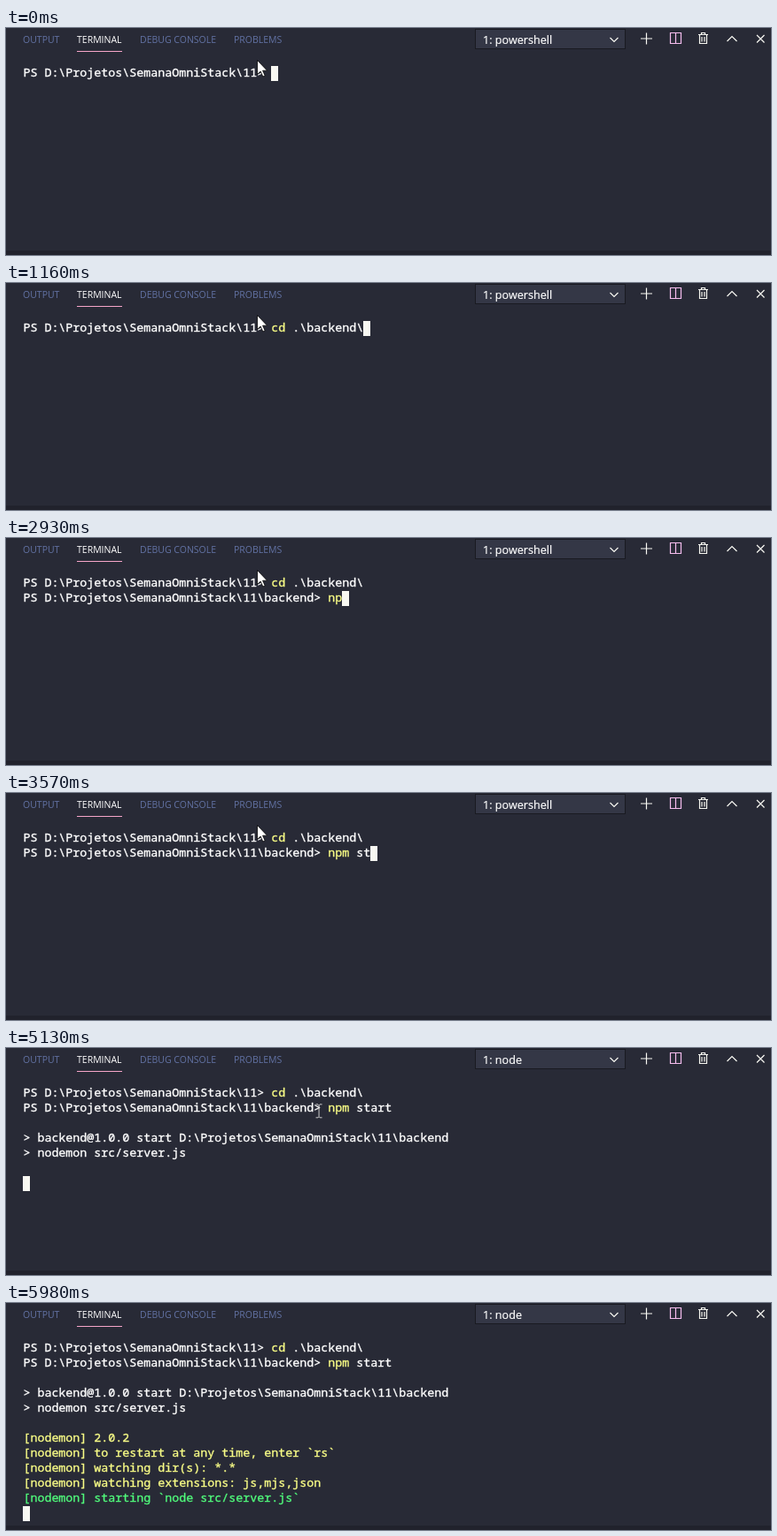
Recreate the animation shown at these times as an HTML page. Size 863 px wide and 257 px high, loop 6.21 s.

```html
<!DOCTYPE html>
<html lang="en">
<head>
<meta charset="utf-8">
<title>Terminal</title>
<style>
  html, body { margin: 0; width: 100%; height: 100%; overflow: hidden; background: #282a36; }
  svg { display: block; }
  text { white-space: pre; fill: #fff; }
  .tab { font: 10.5px "Open Sans", sans-serif; }
  .tab .off { fill: #6272a4; }
  .pick { font: 12.6px "Open Sans", sans-serif; stroke: #fff; stroke-width: .2; }
  #screen text {
    font: 500 13.3333px "Noto Sans Mono", monospace;
    fill: currentColor; stroke: currentColor; stroke-width: .35;
  }
  #screen tspan { fill: currentColor; stroke: currentColor; }
  .icon { fill: none; stroke: #f8f8f2; stroke-width: 1.2; }
</style>
</head>
<body>
<svg width="863" height="257" viewBox="0 0 863 257">
  <rect width="863" height="257" fill="#282a36"/>
  <rect y="252" width="863" height="5" fill="#21222c"/>
  <g class="tab">
    <text class="off" x="19" y="17">OUTPUT</text>
    <text x="80" y="17">TERMINAL</text>
    <text class="off" x="151" y="17">DEBUG CONSOLE</text>
    <text class="off" x="257" y="17">PROBLEMS</text>
  </g>
  <rect x="80" y="26" width="51" height="1" fill="#f7a5ca"/>
  <rect x="529.5" y="1.5" width="169" height="22" fill="#343746" stroke="#191a21"/>
  <text class="pick" id="shell" x="538" y="17.5"></text>
  <g class="icon">
    <path d="M681.5 11l4.5 4.5 4.5-4.5"/>
    <path d="M716 12h13M722.5 5.5v13"/>
    <path d="M749.5 5.5h12v12h-12zM755.5 5.5v12" stroke="#f6bdee"/>
    <path d="M781 7.5h11M784.5 7v-1.5h4V7M782.5 8v9.5h8V8M785 10v5.5M788 10v5.5"/>
    <path d="M813.5 15l5.5-5.5 5.5 5.5"/>
    <path d="M847 8l8.5 8.5M855.5 8l-8.5 8.5"/>
  </g>
  <g id="screen"></g>
  <rect id="caret" width="8" height="17" fill="#f8f8f2"/>
  <path id="arrow" d="M283.5 36.5v16l3.7-3.5 2.6 6 2.4-1-2.6-5.8h5z" fill="#fff" stroke="#000" stroke-width=".8"/>
  <path id="beam" fill="none" stroke="#ccc" d="M-3.5-7.5h2.5l1 1 1-1h2.5M0-6.5v13M-3.5 7.5h2.5l1-1 1 1h2.5"/>
</svg>
<script>
const LOOP = 6210, WHITE = '#ffffff', YELLOW = '#f8fc86', GREEN = '#50fa7b';
const DIR = 'D:\\Projetos\\SemanaOmniStack\\11';
const $ = id => document.getElementById(id);
const show = (el, on) => el.style.display = on ? '' : 'none';
const escape = s => s.replace(/&/g, '&amp;').replace(/</g, '&lt;').replace(/>/g, '&gt;');

// Each key is [time, number of characters typed so far]
const cdKeys = [[220, 1], [300, 2], [770, 3], [1000, 4], [1160, 13]];
const npmKeys = [2700, 2930, 3100, 3250, 3340, 3570, 3800, 3880, 4120].map((t, i) => [t, i + 1]);

function typed(text, keys, t) {
  const n = keys.reduce((len, [at, count]) => t >= at ? count : len, 0);
  return text.slice(0, n);
}

// A row is a list of [text, colour] parts
function prompt(path, command, word) {
  return [[`PS ${path}> `, WHITE], [command.slice(0, word), YELLOW], [command.slice(word), WHITE]];
}

function rowsAt(t) {
  const rows = [prompt(DIR, typed('cd .\\backend\\', cdKeys, t), 2)];
  const add = (color, ...lines) => lines.forEach(s => rows.push([[s, color]]));
  if (t >= 1850) rows.push(prompt(DIR + '\\backend', typed('npm start', npmKeys, t), 3));
  if (t >= 4440) add(WHITE, '');
  if (t >= 5050) add(WHITE, `> backend@1.0.0 start ${DIR}\\backend`, '> nodemon src/server.js', '', '');
  if (t >= 5210) {
    rows.pop();
    add(YELLOW, '[nodemon] 2.0.2', '[nodemon] to restart at any time, enter `rs`',
      '[nodemon] watching dir(s): *.*', '[nodemon] watching extensions: js,mjs,json');
    if (t >= 5290) add(GREEN, '[nodemon] starting `node src/server.js`');
    add(WHITE, '');
  }
  return rows;
}

const ease = p => p * p * (3 - 2 * p);

function beamAt(t) {
  if (t < 5510) {
    const e = ease(Math.min(1, Math.floor((t - 5050) / 77.5) / 4));
    return [290 + 403.5 * e, 46 + 162 * e];
  }
  const e = ease((Math.floor((t - 5510) / 78.3) + 1) / 7);
  return [693.5 + 176 * e, 208 + 48 * e];
}

let last = '';
function frame(now) {
  const t = now % LOOP, rows = rowsAt(t);
  const html = rows.map((row, i) => `<text x="19.4" y="${55 + 17 * i}">` +
    row.map(([s, c]) => `<tspan color="${c}">${escape(s)}</tspan>`).join('') + '</text>').join('');
  if (html !== last) $('screen').innerHTML = last = html;

  const end = rows[rows.length - 1].reduce((n, [s]) => n + s.length, 0);
  $('caret').setAttribute('x', 19 + 8 * end);
  $('caret').setAttribute('y', 43 + 17 * (rows.length - 1));
  $('shell').textContent = t < 4500 ? '1: powershell' : '1: node';

  const moving = t >= 5127.5;
  show($('arrow'), !moving);
  show($('beam'), moving && t < 5979);
  if (moving) $('beam').setAttribute('transform', `translate(${beamAt(t)})`);
  requestAnimationFrame(frame);
}
frame(0);
</script>
</body>
</html>
```
